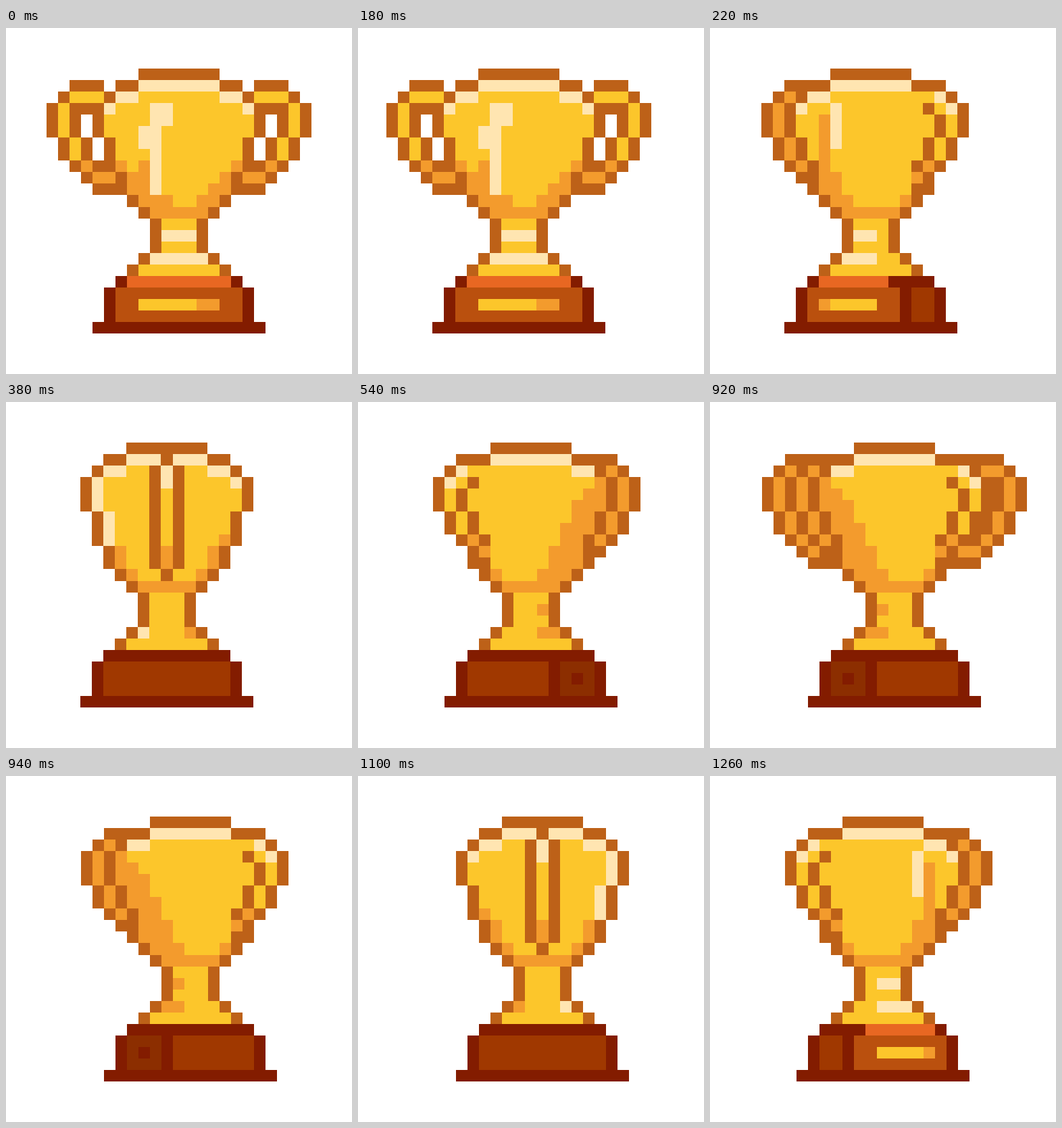
Animation of 512x512 px, one loop 1400 ms. Source, as an HTML page with a canvas:

```html
<!DOCTYPE html>
<html lang="en">
<head>
<meta charset="utf-8">
<title>Spinning trophy</title>
<style>
  html, body { margin: 0; width: 100%; height: 100%; overflow: hidden; background: #fff; }
  canvas { display: block; width: 100vw; height: 100vh; }
</style>
</head>
<body>
<canvas id="stage" width="512" height="512"></canvas>
<script>
const ctx = document.getElementById('stage').getContext('2d');

const BROWN = '#bd6118', GOLD = '#fcc62b', ORANGE = '#f39b2d', CREAM = '#ffe5b1';
const EMBER = '#e86722', DARK = '#831c00', PANEL = '#ba500e', SIDE = '#a03800', BACK = '#8c2e00';

const COLS = 23, ORIGIN = 60, CELL = 392 / COLS, LOOP = 1400;
let shift = 0, flip = false;

const edge = i => Math.round(ORIGIN + i * CELL);

// Cell rectangle: column, row, width, height
function box(color, x, y, w = 1, h = 1) {
  if (flip) x = COLS - x - w;
  ctx.fillStyle = color;
  ctx.fillRect(edge(x) + shift, edge(y), edge(x + w) - edge(x), edge(y + h) - edge(y));
}

function pair(color, x, y, w = 1, h = 1) {
  box(color, x, y, w, h);
  box(color, COLS - x - w, y, w, h);
}

function body() {
  box(BROWN, 8, 0, 7);
  box(CREAM, 8, 1, 7);
  box(GOLD, 6, 2, 11);
  box(GOLD, 5, 3, 13, 3);
  box(GOLD, 6, 6, 11, 3);
  box(GOLD, 7, 9, 9, 2);
  pair(BROWN, 7, 11);
  box(GOLD, 8, 11, 7);
  pair(BROWN, 8, 12);
  box(ORANGE, 9, 12, 5);
  pair(BROWN, 9, 13, 1, 3);
  box(GOLD, 10, 13, 3, 3);
  pair(BROWN, 8, 16);
  box(GOLD, 9, 16, 5);
  pair(BROWN, 7, 17);
  box(GOLD, 8, 17, 7);
  box(DARK, 6, 18, 11);
  box(DARK, 5, 19, 13, 3);
  box(DARK, 4, 22, 15);
}

// Both handles seen flat on
function handles(color) {
  pair(BROWN, 2, 1, 3);
  pair(BROWN, 6, 1, 2);
  pair(BROWN, 1, 2);
  pair(color, 2, 2, 3);
  pair(BROWN, 5, 2);
  pair(CREAM, 6, 2, 2);
  pair(CREAM, 5, 3);
  pair(BROWN, 0, 3, 1, 3);
  pair(color, 1, 3, 1, 3);
  pair(BROWN, 2, 3, 3);
  pair(BROWN, 2, 4, 1, 2);
  pair(BROWN, 4, 4, 1, 2);
  pair(BROWN, 1, 6, 1, 2);
  pair(color, 2, 6, 1, 2);
  pair(BROWN, 3, 6, 1, 2);
  pair(BROWN, 5, 6, 1, 2);
  pair(BROWN, 2, 8);
  pair(ORANGE, 3, 8);
  pair(BROWN, 4, 8, 2);
  pair(ORANGE, 6, 8);
  pair(BROWN, 3, 9);
  pair(ORANGE, 4, 9, 2);
  pair(BROWN, 6, 9);
  pair(BROWN, 4, 10, 3);
}

// Handles of a three-quarter view: inner one left, outer one right
function turnedHandles() {
  box(BROWN, 5, 1, 3);
  box(BROWN, 4, 2);
  box(CREAM, 5, 2);
  box(BROWN, 3, 3, 1, 3);
  box(GOLD, 4, 4, 1, 2);
  box(CREAM, 4, 3);
  box(BROWN, 6, 3);
  box(BROWN, 5, 4, 1, 2);
  box(BROWN, 4, 6, 1, 2);
  box(GOLD, 5, 6, 1, 2);
  box(BROWN, 6, 6, 1, 2);
  box(BROWN, 5, 8);
  box(ORANGE, 6, 8);
  box(BROWN, 7, 8);
  box(BROWN, 6, 9, 1, 2);
  box(ORANGE, 7, 9);
  box(BROWN, 7, 10);
  box(ORANGE, 8, 11);

  box(BROWN, 15, 1, 4);
  box(CREAM, 15, 2, 2);
  box(BROWN, 17, 2);
  box(ORANGE, 18, 2);
  box(BROWN, 19, 2);
  box(BROWN, 18, 3, 1, 3);
  box(ORANGE, 19, 3, 1, 3);
  box(BROWN, 20, 3, 1, 3);
  box(BROWN, 17, 6, 1, 2);
  box(ORANGE, 18, 6, 1, 2);
  box(BROWN, 19, 6, 1, 2);
  box(BROWN, 16, 8);
  box(ORANGE, 17, 8);
  box(BROWN, 18, 8);
  box(BROWN, 16, 9, 2);
  box(BROWN, 16, 10);
}

function front() {
  body();
  handles(GOLD);
  box(ORANGE, 8, 8);
  box(ORANGE, 7, 9, 2, 2);
  box(ORANGE, 15, 9);
  box(ORANGE, 14, 10, 2);
  box(ORANGE, 8, 11, 3);
  box(ORANGE, 13, 11, 2);
  box(CREAM, 9, 3, 2, 2);
  box(CREAM, 8, 5, 2, 2);
  box(CREAM, 9, 7, 1, 4);
  box(CREAM, 10, 14, 3);
  box(CREAM, 9, 16, 5);
  box(EMBER, 7, 18, 9);
  box(PANEL, 6, 19, 11, 3);
  box(GOLD, 8, 20, 5);
  box(ORANGE, 13, 20, 2);
}

function back() {
  body();
  handles(ORANGE);
  box(ORANGE, 9, 3, 5, 2);
  box(ORANGE, 8, 5, 7, 4);
  box(ORANGE, 7, 9, 9, 2);
  box(ORANGE, 8, 11, 7);
  box(ORANGE, 10, 14, 3);
  box(ORANGE, 9, 16, 5);
  box(BACK, 6, 19, 11, 3);
  box(DARK, 8, 20, 7);
}

function frontTurn() {
  body();
  turnedHandles();
  box(CREAM, 17, 3);
  box(CREAM, 14, 3, 1, 4);
  box(ORANGE, 15, 4, 1, 5);
  box(ORANGE, 14, 9, 2, 2);
  box(ORANGE, 13, 11, 2);
  box(CREAM, 11, 14, 2);
  box(CREAM, 11, 16, 3);
  box(EMBER, 10, 18, 6);
  box(SIDE, 6, 19, 2, 3);
  box(PANEL, 9, 19, 8, 3);
  box(GOLD, 11, 20, 4);
  box(ORANGE, 15, 20);
}

function backTurn() {
  body();
  turnedHandles();
  box(ORANGE, 17, 3, 1, 3);
  box(ORANGE, 16, 4, 1, 4);
  box(ORANGE, 15, 5, 1, 4);
  box(ORANGE, 14, 7, 1, 4);
  box(ORANGE, 13, 9, 3, 2);
  box(ORANGE, 12, 11, 3);
  box(ORANGE, 12, 14);
  box(ORANGE, 12, 16, 2);
  box(SIDE, 6, 19, 7, 3);
  box(BACK, 14, 19, 3, 3);
  box(DARK, 15, 20);
}

function side() {
  body();
  pair(BROWN, 6, 1, 2);
  box(BROWN, 11, 1);
  pair(BROWN, 5, 2);
  pair(CREAM, 6, 2, 2);
  pair(BROWN, 4, 3, 1, 3);
  pair(BROWN, 5, 6, 1, 3);
  pair(BROWN, 6, 9, 1, 2);
  box(CREAM, 5, 3, 1, 3);
  box(CREAM, 17, 3);
  box(CREAM, 6, 6, 1, 3);
  box(ORANGE, 16, 8);
  pair(ORANGE, 7, 9, 1, 2);
  pair(ORANGE, 8, 11);
  pair(BROWN, 10, 2, 1, 9);
  box(CREAM, 11, 2, 1, 2);
  box(ORANGE, 11, 9, 1, 2);
  box(BROWN, 11, 11);
  box(CREAM, 9, 16);
  box(ORANGE, 13, 16);
  box(SIDE, 6, 19, 11, 3);
}

const mirror = draw => () => { flip = true; draw(); flip = false; };
const frontAway = mirror(frontTurn), backAway = mirror(backTurn), sideAway = mirror(side);
const LEFT = -18, RIGHT = 17;

// Start time, sideways shift, layers from bottom to top
const steps = [
  [0, 0, front],
  [180, LEFT, front],
  [200, LEFT, front, frontAway],
  [220, LEFT, frontAway],
  [360, LEFT, frontAway, side],
  [380, LEFT, side],
  [520, 0, side, backTurn],
  [540, 0, backTurn],
  [680, 0, backTurn, back],
  [700, 0, back],
  [920, RIGHT, back, backAway],
  [940, RIGHT, backAway],
  [1080, RIGHT, backAway, sideAway],
  [1100, RIGHT, sideAway],
  [1240, 0, sideAway, frontTurn],
  [1260, 0, frontTurn]
];

let shown = null;
function render(time) {
  const step = steps.findLast(s => s[0] <= time);
  if (step === shown) return;
  shown = step;
  const [, dx, ...layers] = step;
  shift = dx;
  ctx.fillStyle = '#fff';
  ctx.fillRect(0, 0, 512, 512);
  layers.forEach(draw => draw());
}

const start = performance.now();
function tick() {
  render((performance.now() - start) % LOOP);
  requestAnimationFrame(tick);
}
tick();
</script>
</body>
</html>
```
